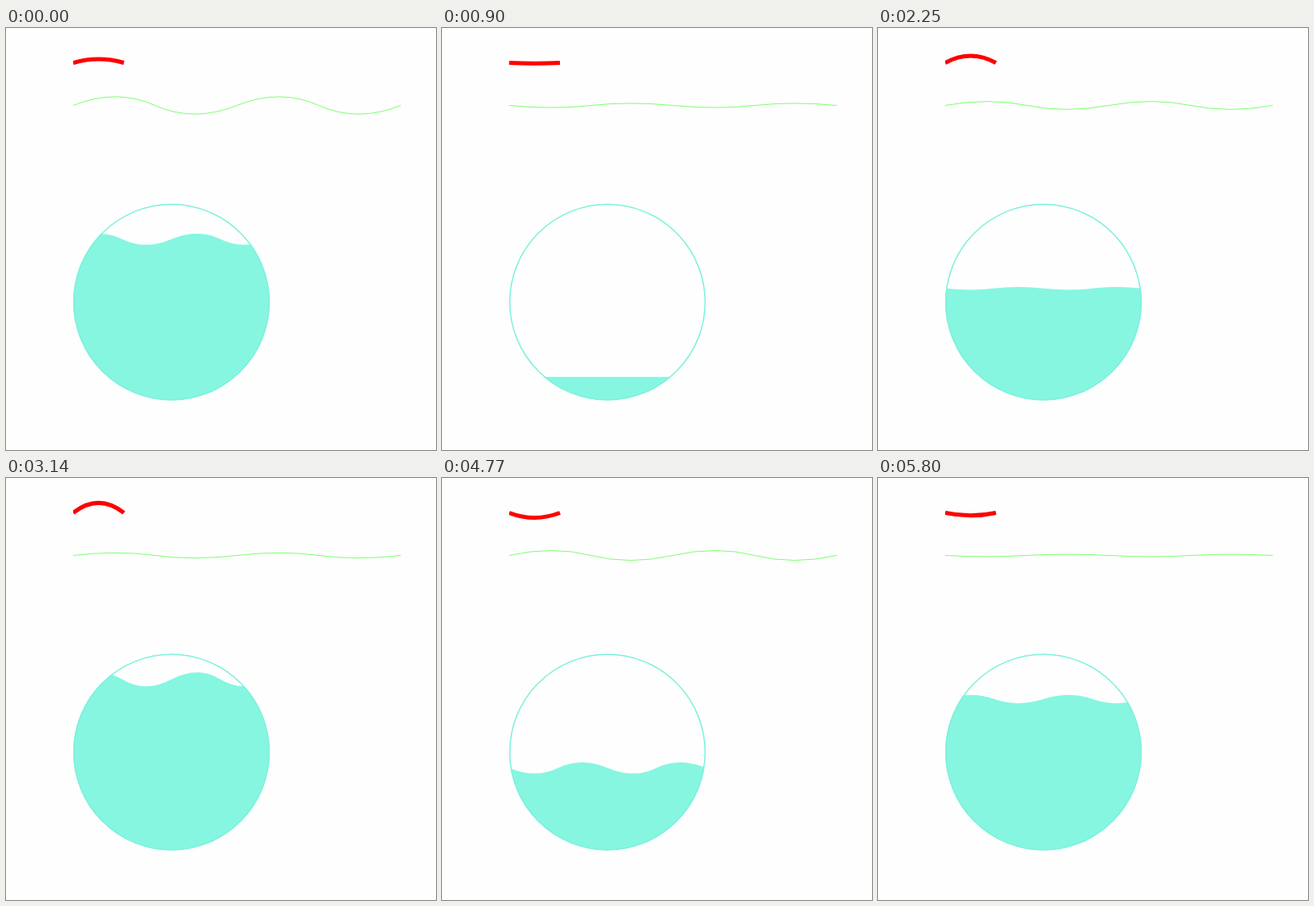
These frames come from a looping animation (525 by 515 pixels, 5900 ms). An HTML page:

```html
<!DOCTYPE html>
<html lang="en">
<head>
<meta charset="utf-8">
<title>Waves</title>
<style>
  html, body { margin: 0; width: 100%; height: 100%; overflow: hidden; background: #fefefe; }
  svg { display: block; width: 525px; height: 515px; }
</style>
</head>
<body>
<svg viewBox="0 0 525 515" fill="none">
  <defs>
    <clipPath id="edge"><rect x="82" y="0" width="402" height="200"/></clipPath>
    <clipPath id="bowl"><circle cx="202" cy="334.5" r="120"/></clipPath>
  </defs>
  <g clip-path="url(#edge)">
    <path id="arc" stroke="#f00" stroke-width="5"/>
    <path id="string" stroke="#7fff70"/>
  </g>
  <g clip-path="url(#bowl)"><path id="water" fill="#86f6e0"/></g>
  <circle cx="202" cy="334.5" r="119.25" stroke="#7ff0dd" stroke-width="1.5"/>
</svg>
<script>
  const LOOP = 5900, STEPS = 40;
  const SHORT = [18, 28, 30, 32, 36]; // steps that last 140 ms
  const [arc, string, water] = ['arc', 'string', 'water'].map(id => document.getElementById(id));

  const mod = (a, n) => ((a % n) + n) % n;

  // Triangle wave: 0, 1, 0, -1 at the quarters of the period
  function tri(x, period) {
    const p = mod(x / period + 0.25, 1);
    return 1 - 4 * Math.abs(p - 0.5);
  }

  // Four joined half waves; a positive height lifts the first one
  function wave(x, y, span, ctrl, height) {
    return `M${x} ${y}q${ctrl} ${-2 * height} ${span} 0` + `t${span} 0`.repeat(3);
  }

  function stepAt(ms) {
    let end = 0;
    for (let i = 0; i < STEPS; i++) {
      end += SHORT.includes(i) ? 140 : 150;
      if (ms < end) return i;
    }
    return STEPS - 1;
  }

  function draw(step) {
    const bend = 12.9 * tri(step - 6.1, 20 / 3);
    arc.setAttribute('d', `M82 42.5q31 ${-2 * bend} 62 0`);

    const swing = -14.3 * tri(step - 5.25, 50 / 3);
    string.setAttribute('d', wave(82, 94.5, 100, 53, swing));

    // The water body has a fixed height and rises as a whole
    const rise = mod(step - 6, 20);
    const slosh = -8.5 * tri(rise, 20);
    water.setAttribute('d', wave(82, 425.8 - 12 * rise, 60, 32, slosh) + 'v210h-240z');
  }

  const start = performance.now();
  function tick() {
    draw(stepAt((performance.now() - start) % LOOP));
    requestAnimationFrame(tick);
  }
  tick();
</script>
</body>
</html>
```
